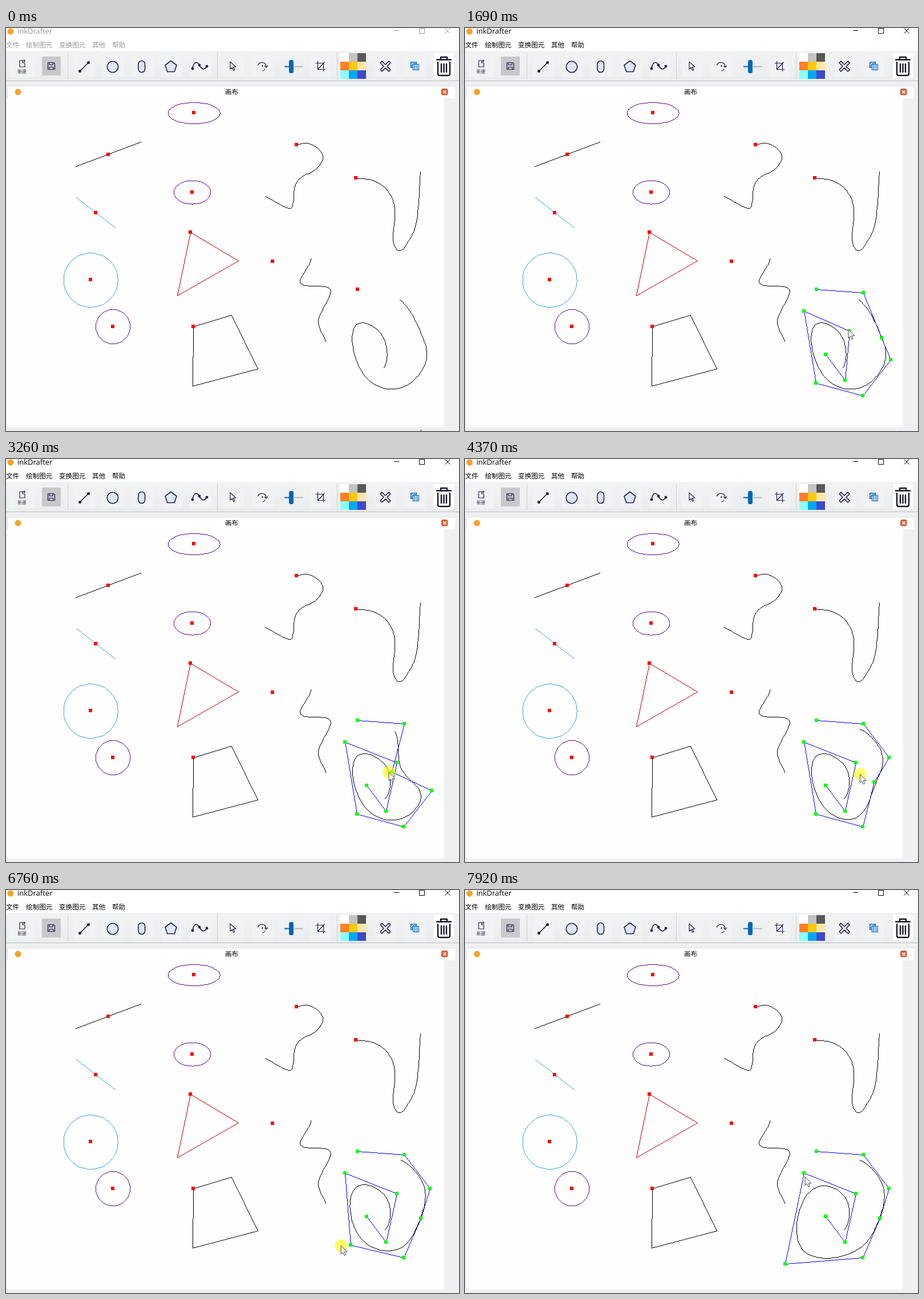
Recreate the animation shown at these times as an HTML page. Size 794x705 px, loop 8 s.

```html
<!DOCTYPE html>
<html lang="zh-CN">
<head>
<meta charset="utf-8">
<title>inkDrafter</title>
<style>
html, body { margin: 0; width: 100%; height: 100%; overflow: hidden; background: #eff0f1; }
svg { display: block; }
text { font-family: "Noto Sans CJK SC", "Noto Sans CJK", sans-serif; }
.pixels { fill: none; stroke-width: 1; shape-rendering: crispEdges; }
.icon { fill: none; stroke: #20204c; stroke-width: 1.6; stroke-linecap: round; stroke-linejoin: round; }
.fine { stroke-width: 1.2; }
.dots { fill: #20204c; stroke: none; }
.soft { fill: #dfe6f9; }
</style>
</head>
<body>
<svg width="794" height="705" viewBox="0 0 794 705">
  <rect width="794" height="705" fill="#eff0f1"/>
  <rect width="794" height="40" fill="#fff"/>
  <circle cx="8" cy="6" r="5.5" fill="#f5a32a"/>
  <g id="chrome" font-size="11.6">
    <text x="20" y="10" font-size="13" style="font-family:'Open Sans',sans-serif">inkDrafter</text>
    <text x="0" y="34">文件</text>
    <text x="35" y="34">绘制图元</text>
    <text x="93" y="34">变换图元</text>
    <text x="151" y="34">其他</text>
    <text x="186" y="34">帮助</text>
    <path id="winButtons" d="M680 4.5h9M724.5.5h9v9h-9zM769.5.5l9 9m0-9l-9 9" fill="none"/>
  </g>

  <!-- toolbar -->
  <linearGradient id="bar" x2="0" y2="1"><stop stop-color="#f1f2f3"/><stop offset="1" stop-color="#eaedef"/></linearGradient>
  <rect y="40" width="794" height="53" fill="url(#bar)"/>
  <path d="M0 92.5H794" stroke="#b9bec2"/>
  <path d="M108.5 43V90M370.5 43V90M580.5 43V90" stroke="#cdd0d3"/>
  <g id="tiles" fill="#f0f2f4"></g>
  <rect x="63" y="50" width="33" height="33" fill="#c7c8ca"/>
  <text x="28" y="79" font-size="7.8" text-anchor="middle" fill="#333">新建</text>
  <g class="icon">
    <path class="fine" d="M29 57h-5v11h9v-6M29 57v4h4M32 55.5v4M30 57.5h4"/>
    <path class="fine" d="M73.5 60.5h10l2 2v10h-12zM76 60.5v4h6v-4M76 72.5v-4h7v4"/>
    <path d="M130 75L144 61"/>
    <g class="dots"><circle cx="129.5" cy="75.5" r="2.5"/><circle cx="144.5" cy="60.5" r="2.5"/></g>
    <circle class="soft" cx="187" cy="68" r="9.7"/>
    <rect class="soft" x="232" y="57.5" width="11.5" height="20" rx="5.7"/>
    <path class="soft" d="M289 57.5l10 7.5-3.8 11.5h-12.4L279 65z"/>
    <path d="M327 71c2-13 8-13 12-6s8 10 13 2"/>
    <g class="dots"><circle cx="327" cy="71" r="2.4"/><circle cx="339" cy="65" r="2.4"/><circle cx="352" cy="67" r="2.4"/></g>
    <path class="fine" d="M393 59v13l3.3-2.8 2.5 5 2-1-2.5-4.8 4.5-.4z"/>
    <path class="fine" d="M441.5 65a7.5 7 0 0 1 14.5 1.500m-2.500-.5l2.500 3 2.500-3M454 72a7 7 0 0 1-4 3"/>
    <circle class="fine" cx="449.5" cy="66.5" r=".7"/>
    <path class="fine" d="M546.5 58v14.5h13M543 61.5h13.5v14M547 72l11-12"/>
    <path d="M659 58l6 6 6-6 3 3-6 6 6 6-3 3-6-6-6 6-3-3 6-6-6-6z"/>
  </g>
  <path d="M488 67.5h9" stroke="#0067b8" stroke-width="2"/>
  <path d="M505 67.5h16" stroke="#b5b7ba" stroke-width="2"/>
  <rect x="496" y="56" width="8" height="23" rx="3" fill="#0067b8"/>
  <g id="palette"></g>
  <g fill="none" stroke="#1673c4" stroke-width="1.2">
    <path d="M709.5 59.5h10v10h-10zM709.5 63l3.5-3.5M709.5 67l7.500-7.500M710 69.500l9-9"/>
    <path d="M713.5 63.5h10v10h-10z" fill="#cfe4f6"/>
    <path d="M716.5 64v9M720.5 64v9"/>
  </g>
  <rect x="750" y="44" width="35" height="44" fill="#fff"/>
  <path class="icon" style="stroke:#15152a;stroke-width:2.4"
    d="M755 55.5h25M762 55v-4h11v4M757 60v20q0 3 3 3h15q3 0 3-3V60M763 63v14M767.5 63v14M772 63v14"/>

  <!-- canvas window -->
  <rect x="2" y="101" width="787" height="22" fill="#fff"/>
  <path class="pixels" d="M2.5 123v-21.5h786V123" stroke="#dde0e2"/>
  <rect x="2" y="123" width="766" height="576" fill="#fefefe"/>
  <circle cx="21" cy="112" r="5.5" fill="#f5a32a"/>
  <text x="395.5" y="116" font-size="11.5" text-anchor="middle">画布</text>
  <rect x="763.5" y="106.5" width="10.5" height="10.5" rx="2" fill="#e2643f" stroke="#c4492a"/>
  <path d="M766.5 109.5l5 5m0-5l-5 5" stroke="#fff" stroke-width="1.5"/>

  <g id="drawing"></g>
  <path id="curve" class="pixels" stroke="#000"/>
  <g id="selection">
    <path id="cage" class="pixels" stroke="#00f"/>
    <path id="handles" fill="#0f0"/>
  </g>
  <path id="idleAnchor" fill="#f00"/>
  <g id="cursor">
    <circle id="press" r="11" fill="#ff0" fill-opacity=".6"/>
    <path d="M0 0V15L3.5 11.8 6 17.3 8.3 16.3 6 11H11Z" fill="#fff" stroke="#444"/>
  </g>
</svg>
<script>
const LOOP = 8000, LAG = 70, FOCUS = 980, SELECT = 1060;
const $ = id => document.getElementById(id);
const mix = (a, b, k) => a.map((v, i) => v + (b[i] - v) * k);
const ease = u => u * u * (3 - 2 * u);

// --- geometry ---
const bSpline = t => [(1 - t) ** 3, 3 * t ** 3 - 6 * t * t + 4, -3 * t ** 3 + 3 * t * t + 3 * t + 1, t ** 3].map(w => w / 6);
const catmullRom = t => [-t * (1 - t) ** 2, 3 * t ** 3 - 5 * t * t + 2, -3 * t ** 3 + 4 * t * t + t, t ** 3 - t * t].map(w => w / 2);

function sample(points, basis, steps = 14) {
  const out = [], segments = points.length - 3;
  for (let k = 0; k <= segments * steps; k++) {
    const i = Math.min(Math.floor(k / steps), segments - 1);
    const weights = basis(k / steps - i);
    out.push([0, 1].map(axis => weights.reduce((sum, w, j) => sum + w * points[i + j][axis], 0)));
  }
  return out;
}

// One-pixel line without smoothing
function pixelLine(points) {
  const grid = points.map(p => p.map(Math.round));
  let d = "";
  for (let i = 1; i < grid.length; i++) {
    const a = grid[i - 1], b = grid[i];
    const n = Math.max(Math.abs(b[0] - a[0]), Math.abs(b[1] - a[1]));
    for (let k = 0; k <= n; k++) {
      const [x, y] = mix(a, b, n ? k / n : 0).map(Math.round);
      d += `M${x} ${y}.5h1`;
    }
  }
  return d;
}

const squares = points => points.map(([x, y]) =>
  `M${Math.round(x) - 3} ${Math.round(y) - 3}h6v6h-6z`).join("");

// --- resting shapes: outline and anchor ---
const line = (a, b) => ({ outline: [a, b], anchor: mix(a, b, .5) });
const polygon = (...p) => ({ outline: [...p, p[0]], anchor: p[0] });
const spline = (...p) => ({ outline: sample(p, bSpline), anchor: p[0] });
const through = (...p) => ({ outline: sample([p[0], ...p, p[p.length - 1]], catmullRom), anchor: p[0] });
const ellipse = (cx, cy, rx, ry = rx) => ({
  outline: Array.from({ length: 73 }, (_, i) => i * Math.PI / 36).map(a => [cx + rx * Math.cos(a), cy + ry * Math.sin(a)]),
  anchor: [cx, Math.floor(cy)]
});

const shapes = {
  "#000": [
    line([122, 242], [236, 199]),
    polygon([328, 522], [395, 502], [441, 596], [327, 626]),
    through([509, 204], [528, 201], [547, 211], [555, 228], [542, 247], [518, 260], [506, 276], [503, 303], [495, 315], [454, 294]),
    through([613, 262], [645, 267], [669, 285], [681, 317], [678, 370], [688, 389], [702, 377], [719, 338], [726, 251]),
    spline([467, 408], [563, 387], [484, 462], [597, 440], [530, 514], [570, 545], [550, 594])
  ],
  "#c00000": [polygon([323, 357], [407, 407], [300, 468])],
  "#3a9ff5": [line([123, 296], [191, 349]), ellipse(148, 440.5, 47.5)],
  "#5a0a96": [ellipse(329, 148.5, 45.5, 18.5), ellipse(326, 287, 32, 20.5), ellipse(187, 522, 30)]
};

// --- edited curve and pointer ---
const controls = [[616, 457], [698, 463], [730, 542], [746, 580], [697, 643],
  [615, 621], [594, 495], [674, 530], [666, 616], [632, 571]];

// times: arrive, press, turn, settle, release
const gestures = [
  { at: controls[0], times: [750, 980, 1000, 1040, 1080] },
  { point: 7, to: [685, 531], times: [1770, 1790, 1950, 2100, 2250] },
  { point: 2, via: [671, 548], to: [743, 522], times: [2630, 2880, 3260, 3520, 3810] },
  { point: 3, via: [680, 545], to: [727, 574], times: [4130, 4178, 4445, 4680, 4760] },
  { at: [614, 617], to: [520, 618], times: [5050, 5400, 5700, 5740, 5900] },
  { point: 5, via: [540, 624], to: [561, 654], times: [6440, 6590, 7004, 7250, 7400] }
];

const track = [{ time: 70, pos: [727, 703] }];
for (const { point, at = controls[point], to = at, via = to, times } of gestures)
  [at, at, via, to, to].forEach((pos, i) => track.push({ time: times[i], pos }));
track.push({ time: 7880, pos: [596, 502] });

function pointerAt(t) {
  const next = track.findIndex(key => key.time > t);
  if (next < 0) return track[track.length - 1].pos;
  const b = track[next], a = track[Math.max(next - 1, 0)];
  return a === b ? a.pos : mix(a.pos, b.pos, ease((t - a.time) / (b.time - a.time)));
}

function render(t) {
  const points = controls.slice();
  let pressed = false;
  for (const { point, times: [, press, , , release] } of gestures) {
    pressed ||= t >= press && t < release;
    if (point && t - LAG > press) points[point] = pointerAt(Math.min(t - LAG, release));
  }
  const selected = t >= SELECT, ink = t >= FOCUS ? "#000" : "#999";
  $("chrome").setAttribute("fill", ink);
  $("winButtons").setAttribute("stroke", ink);
  $("curve").setAttribute("d", pixelLine(sample(points, bSpline)));
  $("cage").setAttribute("d", pixelLine(points));
  $("handles").setAttribute("d", squares(points));
  $("selection").style.display = selected ? "" : "none";
  $("idleAnchor").style.display = selected ? "none" : "";
  $("cursor").setAttribute("transform", `translate(${pointerAt(t)})`);
  $("press").style.display = pressed ? "" : "none";
}

// --- fixed parts ---
const box = (x, y, w, h, fill = "inherit") => `<rect x="${x}" y="${y}" width="${w}" height="${h}" fill="${fill}"/>`;
const row = (center, count) => Array.from({ length: count }, (_, i) => box(center + i * 51 - 18, 48, 37, 37)).join("");
$("tiles").innerHTML = box(5, 47, 45, 39) + row(137, 5) + row(398, 2) + row(551, 1) + row(665, 2);
$("palette").innerHTML = ["#fff", "#c3c3c3", "#585858", "#ff7f27", "#ffc90e", "#ffe6a6", "#8cfffb", "#00a8f3", "#3f48cc"]
  .map((color, i) => box(586 + i % 3 * 15, 44 + Math.floor(i / 3) * 15, 15, 15, color)).join("");
$("drawing").innerHTML = Object.entries(shapes).map(([color, list]) =>
  `<path class="pixels" stroke="${color}" d="${list.map(s => pixelLine(s.outline)).join("")}"/>`).join("") +
  `<path fill="#f00" d="${squares(Object.values(shapes).flat().map(s => s.anchor))}"/>`;
$("idleAnchor").setAttribute("d", squares([controls[0]]));

const begin = performance.now();
function tick() {
  render((performance.now() - begin) % LOOP);
  requestAnimationFrame(tick);
}
tick();
</script>
</body>
</html>
```
